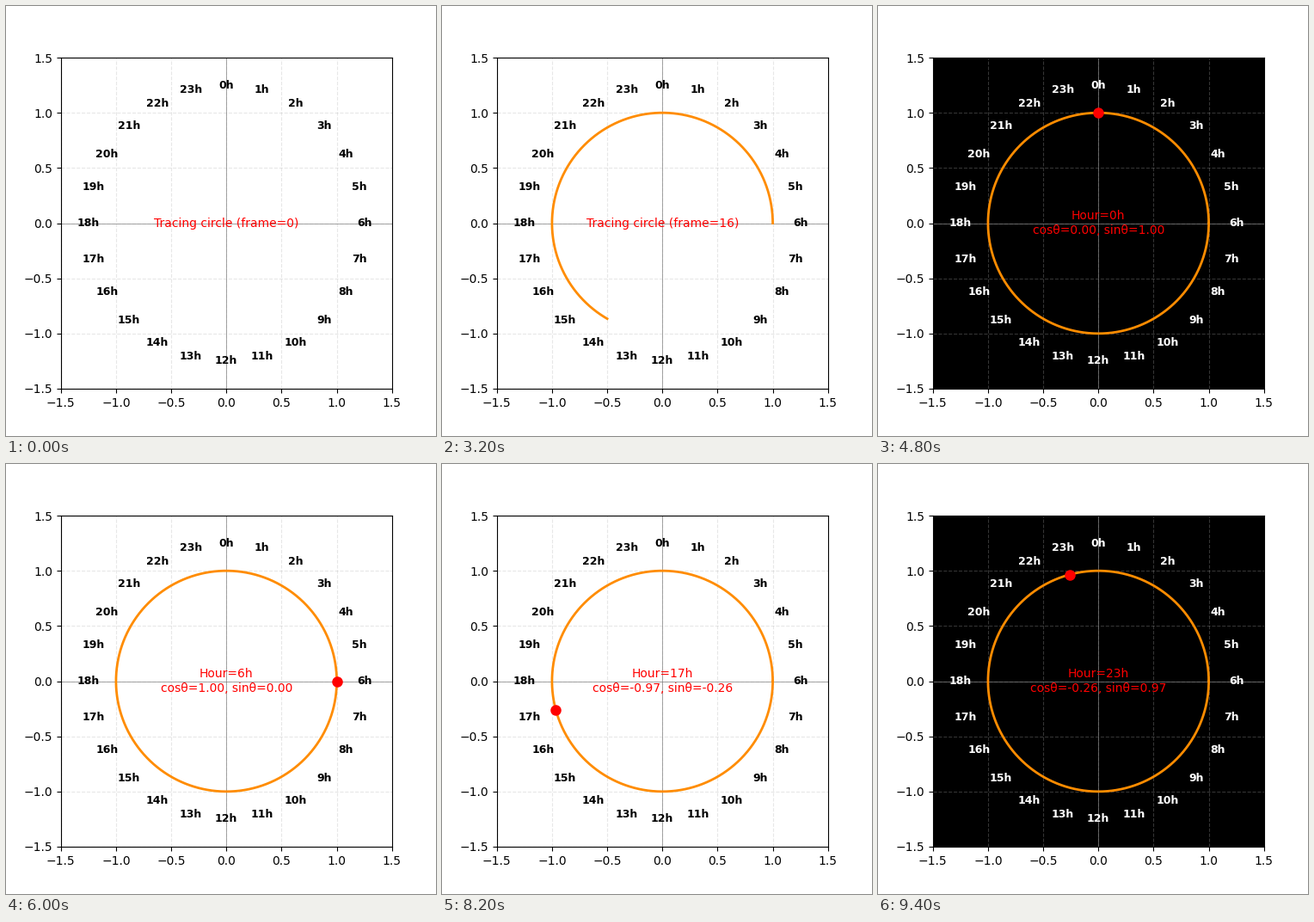
Write a matplotlib script that moves like this. It is 500 px wide and 500 px high and loops after 9600 ms.

```python
import numpy as np
import matplotlib.pyplot as plt
from matplotlib.animation import FuncAnimation

HOURS = 24
DAY = range(6, 18)

fig, ax = plt.subplots(figsize=(5, 5), dpi=100)
ax.set_xlim(-1.5, 1.5)
ax.set_ylim(-1.5, 1.5)
ax.set_aspect("equal")
ax.grid(True, linestyle="--", alpha=0.3)
ax.axhline(0, color="gray", linewidth=0.5)
ax.axvline(0, color="gray", linewidth=0.5)


def hour_angle(hour):
    """Clockwise angle with hour 0 at the top."""
    return np.pi / 2 - 2 * np.pi * hour / HOURS


labels = []
for hour in range(HOURS):
    a = hour_angle(hour)
    labels.append(ax.text(1.25 * np.cos(a), 1.25 * np.sin(a), f"{hour}h",
                          ha="center", va="center", fontsize=9, fontweight="bold"))

circle, = ax.plot([], [], color="darkorange", linewidth=2)
dot, = ax.plot([], [], "o", color="red", markersize=8)
info = ax.text(0, 0, "", color="red", fontsize=10, ha="center", va="center")


def set_theme(night):
    ax.set_facecolor("black" if night else "white")
    for label in labels:
        label.set_color("white" if night else "black")


def draw_arc(fraction):
    t = np.linspace(0, 2 * np.pi * fraction, 300)
    circle.set_data(np.cos(t), np.sin(t))


def update(frame):
    if frame < HOURS:
        set_theme(night=False)
        if frame:
            draw_arc(frame / HOURS)
        else:
            circle.set_data([], [])
        dot.set_data([], [])
        info.set_text(f"Tracing circle (frame={frame})")
    else:
        hour = frame - HOURS
        a = hour_angle(hour)
        x, y = np.cos(a), np.sin(a)
        set_theme(night=hour not in DAY)
        draw_arc(1)
        dot.set_data([x], [y])
        info.set_text(f"Hour={hour}h\ncosθ={x:.2f}, sinθ={y:.2f}")
    return circle, dot, info, *labels


anim = FuncAnimation(fig, update, frames=2 * HOURS, interval=200,
                     repeat=True, repeat_delay=0, blit=False)
plt.show()
```
